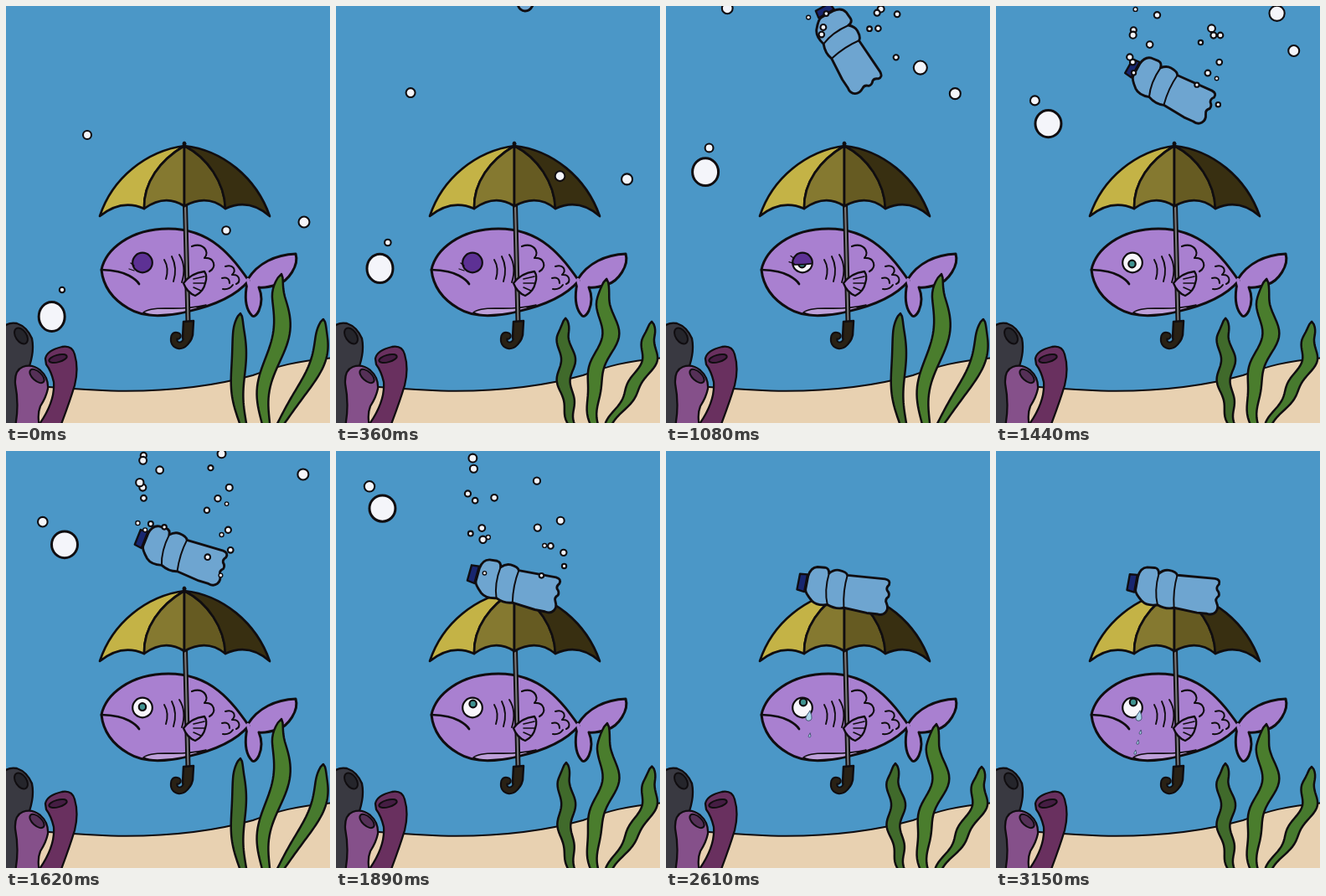
An HTML page with a canvas that plays this animation: 387x498 px, repeating every 3240 ms.

```html
<!DOCTYPE html>
<html lang="en">
<head>
<meta charset="utf-8">
<title>Fish with umbrella</title>
<style>
html, body { margin: 0; width: 100%; height: 100%; overflow: hidden; background: #4b97c7; }
canvas { display: block; width: 387px; height: 498px; }
</style>
</head>
<body>
<canvas id="stage" width="387" height="498"></canvas>
<script>
const LOOP = 3240, STEP = 90, INK = '#100d10', TAU = Math.PI * 2;
const ctx = document.getElementById('stage').getContext('2d');
ctx.lineJoin = ctx.lineCap = 'round';

const clamp = v => Math.min(1, Math.max(0, v));
const mix = (a, b, k) => a + (b - a) * k;
const rand = n => { const v = Math.sin(n * 12.9898) * 43758.5453; return v - Math.floor(v); };

function shape(d, fill, width = 2.7, ink = INK) {
  const p = d instanceof Path2D ? d : new Path2D(d);
  if (fill) { ctx.fillStyle = fill; ctx.fill(p); }
  if (width) { ctx.lineWidth = width; ctx.strokeStyle = ink; ctx.stroke(p); }
}

function oval(x, y, rx, ry, fill, width = 2, turn = 0) {
  const p = new Path2D();
  p.ellipse(x, y, rx, ry, turn * Math.PI / 180, 0, TAU);
  shape(p, fill, width);
}

// ---- seabed and corals
function seabed() {
  ctx.fillStyle = '#4b97c7';
  ctx.fillRect(0, 0, 387, 498);
  shape('M-5 450 Q65 457 125 459.5 C190 461 245 455 295 441 C325 430 345 424 392 420 V505 H-5 Z', '#e8d1b1', 2);
}

function corals() {
  shape('M-4 384 Q3 377 13 379 Q25 383 31 397 Q34 412 28 430 Q18 455 18 502 H-4 Z', '#393941', 2.3);
  oval(18, 394, 6.5, 10.5, '#25252b', 2, -34);
  shape('M47 421 Q49 411 67 407 Q79 405 82 416 Q87 433 82 453 Q76 473 65 502 H38 Q59 473 57 449 Q54 436 48 428 Z', '#69305f', 2.3);
  oval(62, 421, 11, 4.3, '#451d43', 2, -15);
  shape('M11 451 Q10 435 20 431 Q31 427 41 435 Q51 444 50 457 Q48 467 41 478 Q37 488 40 502 H11 Q16 477 11 451 Z', '#85508a', 2.3);
  oval(37, 442, 10.5, 5.5, '#553057', 2, 42);
}

// ---- seaweed: a bowed, waving spine with a tapering width
const WEEDS = [
  { color: '#406a2b', base: 283, tip: [280, 367], lean: [-6, 6], bow: -5, wave: 2, half: 8.5 },
  { color: '#4a7d2d', base: 309, tip: [329, 320], lean: [-6, 6], bow: 1, wave: 7, half: 10 },
  { color: '#477a2e', base: 327, tip: [379, 374], lean: [-2, 3], bow: 13, wave: 2, half: 9 }
];

function weed({ color, base, tip, lean, bow, wave, half }, sway) {
  const x = tip[0] + lean[0] * sway, y = tip[1] + lean[1] * sway;
  const left = [], right = [];
  for (let s = 0; s <= 1.001; s += 0.025) {
    const ripple = -2.8 * sway * clamp(s * 6) * Math.cos(TAU * (s - 0.2) / 0.38);
    const mid = mix(x, base, s) + bow * Math.sin(Math.PI * s) + ripple
      + wave * clamp(s * 6) * Math.sin(TAU * (s - 0.17) / 0.8);
    const w = half * Math.sin(Math.PI * 0.85 * s ** 0.6);
    const h = mix(y, 500, s);
    left.push([mid - w, h]);
    right.unshift([mid + w, h]);
  }
  const p = new Path2D();
  for (const pt of [...left, ...right]) p.lineTo(...pt);
  p.closePath();
  shape(p, color, 2.5);
}

function weeds(t) {
  const sway = Math.sin(Math.PI / 2 * clamp((t % 540) / 430));
  for (const w of WEEDS) weed(w, sway);
}

// ---- fish
const SKIN = '#a980d0';

function fishBody() {
  shape('M289 326 C301 307 322 297 346 296 C350 309 338 329 323 333 Q310 337 302 336 Q308 350 302 364 Q298 372 294 370 Q284 360 287 337 Z', SKIN, 3);
  shape('M114 315 C119 291 148 266 194 266 C246 266 270 300 290 328 C275 346 248 358 216 365 C187 372 162 371 146 361 C127 350 116 334 114 315 Z', SKIN, 3);
  shape('M289 327 L291 335', null, 4, SKIN);
  shape('M164 366 Q170 361 190 361 Q218 362 239 357 Q211 369 181 369 Q170 369 164 366 Z', '#bea0d9', 1.6);
  shape('M114 315 Q137 316 147 322 Q156 327 159 332', null, 2.7);
  shape('M189 303 Q195 313 191 326 M198 299 Q205 313 200 329 M207 297 Q216 311 210 330', null, 1.9);
  shape('M222 287 C235 282 244 293 237 301 C249 300 252 312 243 317', null, 2.2);
  shape('M262 311 C271 308 276 315 270 321 C279 320 281 329 275 332 M258 325 Q267 323 267 331 M259 338 Q267 339 271 333', null, 2);
}

function fin() {
  shape('M212 331 Q221 319 237 317 Q241 323 238 331 Q236 341 226 346 Q216 342 212 331 Z', SKIN, 2.3);
  shape('M224 326 L237 323 M224 331 L238 331 M224 336 L233 340', null, 1.6);
}

function eye(t) {
  const lid = 1 - clamp((t - 540) / 800) ** 2;
  const look = clamp((t - 1440) / 600);
  const x = 163, y = 306.5, r = 11.8;
  const rim = new Path2D();
  rim.arc(x, y, r, 0, TAU);
  const edge = y - r + 2 * r * lid;
  ctx.save();
  ctx.clip(rim);
  shape(rim, '#f8f6fb', 0);
  oval(162.5 + 1.5 * look, 308 - 8 * look, 4.2, 4.4, '#3f9290', 2.2);
  if (lid > 0) shape(`M145 280 H182 V${edge - 1} Q164 ${edge + 2} 145 ${edge + 1} Z`, '#5d3194', 1.8);
  ctx.restore();
  shape(rim, null, 2.2);
  if (lid > 0) {
    const lash = Math.min(edge, 316);
    shape(`M153 ${lash} l-6 -2 M153 ${lash - 6} l-4 -3`, null, 1.3);
  }
}

function tear(x, y, s) {
  shape(`M${x + s * 0.4} ${y - s * 1.5} Q${x + s * 1.5} ${y + s} ${x} ${y + s} Q${x - s * 1.5} ${y + s * 0.8} ${x + s * 0.4} ${y - s * 1.5} Z`, '#a9d3e8', 0.9, '#3c4c69');
}

function tears(t) {
  if (t < 2160) return;
  tear(170, 317.5, mix(1, 4.8, clamp((t - 2160) / 270)));
  for (let start = 2310; start < t; start += 200) {
    const fall = (t - start) * 0.06;
    if (fall > 8 && fall < 44) tear(176 - fall * 0.26, 322 + fall, 1.9);
  }
}

// ---- umbrella
function pole() {
  const shaft = 'M214 237 L217.5 377', hook = 'M217 394 Q215 405 207 405.5 Q199 404 201 395 Q202 393 205 394';
  shape(shaft, null, 6);
  shape(shaft, null, 2.2, '#77777a');
  shape(hook, null, 9.5);
  shape('M212 377 L224 376 L223 393 Q221 402 214 406 L211 396 Z', '#292115', 2.5);
  shape(hook, null, 5.5, '#292115');
}

function canopy() {
  shape('M213 167 C168 173 127 205 112 251 Q138 230 165 242 C164 211 184 184 213 167 Z', '#c4b346');
  shape('M213 167 C184 184 164 211 165 242 Q190 224 213 239 Z', '#857930');
  shape('M213 167 V239 Q240 224 262 242 C261 211 241 181 213 167 Z', '#665b22');
  shape('M213 167 C241 181 261 211 262 242 Q290 229 315 251 C299 205 259 172 213 167 Z', '#382f11');
  oval(213, 164.5, 2, 2.5, INK, 1);
}

// ---- bottle: sinks steadily, swings and tips over until it lands
const bottleX = t => 213 - 6 * Math.sin(Math.PI * clamp((t - 1080) / 720));
const bottleY = t => Math.min(168, 0.137 * t - 97);
const bottleTurn = t => 10 + 51 * Math.exp(-Math.max(0, t - 1080) / 365);

function bottle(t) {
  if (t < 270) return;
  ctx.save();
  ctx.translate(bottleX(t), bottleY(t));
  ctx.rotate(bottleTurn(t) * Math.PI / 180);
  shape('M-56 -11 L-47 -12 L-47 9 L-56 8 Z', '#18266f', 2.4);
  shape('M-46 -10 Q-45 -21 -37 -23 L-28 -24 Q-23 -24 -22 -18 Q-17 -24 -11 -24 Q-2 -24 0 -20 L45 -24 Q52 -24 51 -18 Q48 -14 50 -11 Q54 -8 53 -4 Q49 0 52 4 Q56 10 53 15 Q50 20 43 19 L31 20 L3 19 Q-6 23 -17 19 Q-29 23 -36 18 Q-46 10 -46 6 Z', '#6ea5d0', 2.9);
  shape('M-22 -18 Q-24 3 -17 19 M0 -20 Q-2 -1 3 19', null, 2);
  ctx.restore();
}

// ---- bubbles
const bubble = (x, y, rx, ry = rx) =>
  oval(x, y, rx, ry, '#f4f5fa', rx > 10 ? 3 : rx < 2.6 ? 1.4 : 2.1);

// Each drifter gives its place, radius and growth as functions of seconds.
const DRIFTERS = [
  s => [58 + 12 * Math.cos(TAU * (s - 0.67) / 0.95), 371 - 160 * s, 15.5, 17.5 - s],
  s => [67 - 14.3 * s, 339 - 157 * s, 3.2 + 1.6 * s],
  s => [97 - 22 * s, 154 - 140 * s, 5 + 1.3 * s],
  s => [263 + 35 * s * s, 268 - 180 * s, 4.8 + 3 * s],
  s => [347 + 9 * Math.cos(TAU * s / 1.5), 258 - 142 * s, 6.5]
];

function fizz(t) {
  for (let i = 0; i < 63; i++) {
    const born = 450 + i * 22, life = 300 + 400 * rand(i + 1);
    const age = (t - born) / life;
    if (age < 0 || age > 1) continue;
    const side = i % 2 ? 1 : -1;
    const x = bottleX(born) + 6 + side * (24 + 34 * rand(i + 101));
    const y = bottleY(born) + side * 10 + 30 * (rand(i + 201) - 0.5) - (t - born) * 0.13;
    bubble(x, y, 1.6 + 2 * rand(i + 301) + 2.5 * age * rand(i + 401));
  }
}

function bubbles(t) {
  for (const place of DRIFTERS) bubble(...place(t / 1000));
  fizz(t);
}

function draw(t) {
  seabed();
  corals();
  fishBody();
  eye(t);
  tears(t);
  pole();
  fin();
  canopy();
  weeds(t);
  bottle(t);
  bubbles(t);
}

const begin = performance.now();
function tick() {
  const t = (performance.now() - begin) % LOOP;
  draw(Math.floor(t / STEP) * STEP);
  requestAnimationFrame(tick);
}
tick();
</script>
</body>
</html>
```
